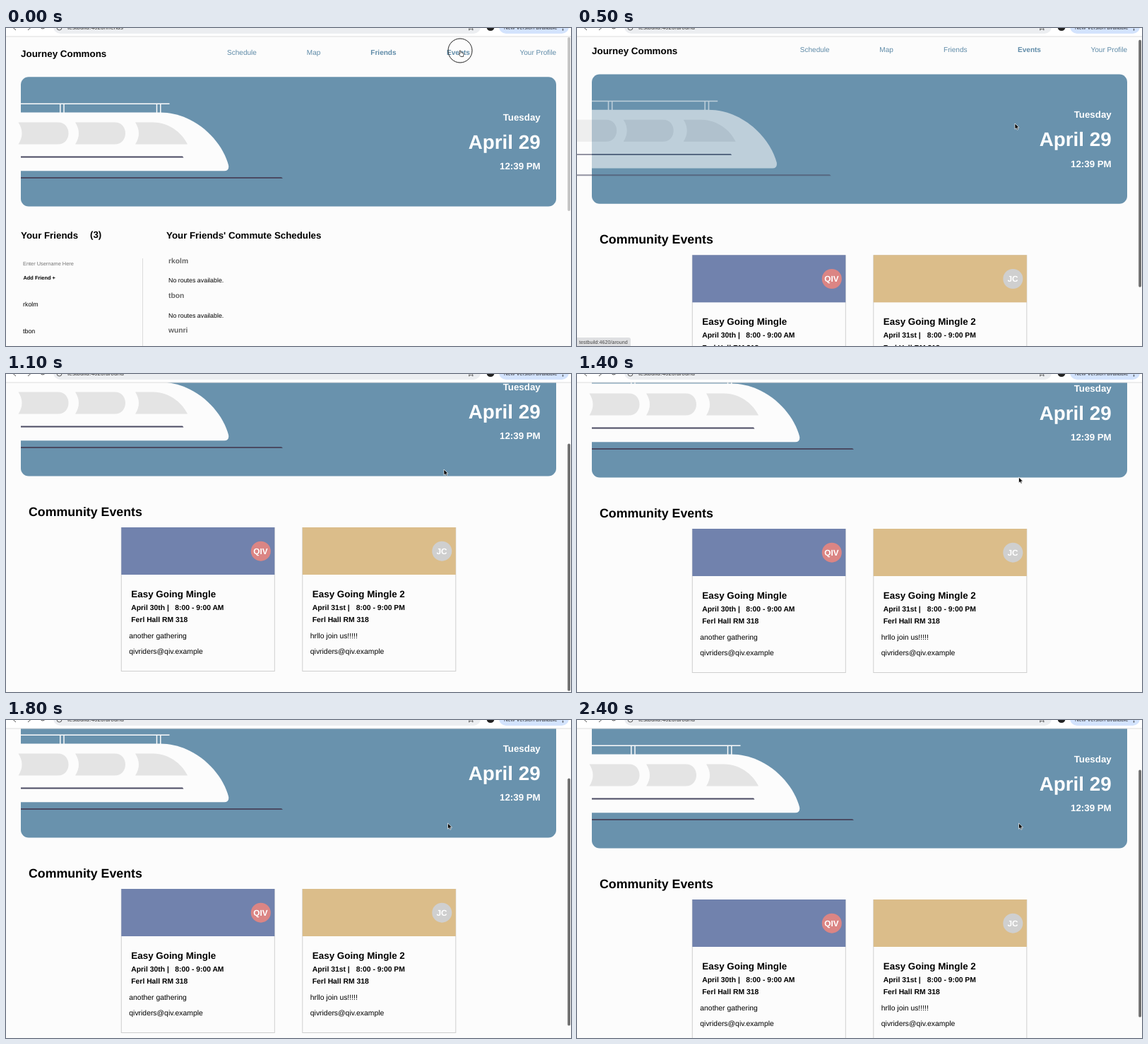
Recreate the animation shown at these times as an HTML page. Size 800 px wide and 450 px high, loop 2500 ms.

```html
<!DOCTYPE html>
<html lang="en">
<head>
<meta charset="utf-8">
<title>Commute dashboard</title>
<style>
html, body { margin: 0; width: 100%; height: 100%; overflow: hidden; background: #fcfcfc; }
svg { display: block; width: 800px; height: 450px; }
text { font-family: "Liberation Sans", Arial, sans-serif; text-rendering: geometricPrecision; white-space: pre; }
.b { font-weight: 700; }
.r { text-anchor: end; }
.m { text-anchor: middle; }
</style>
</head>
<body>
<svg id="stage" viewBox="0 0 800 450"></svg>
<script>
const BLUE = '#6992ad', LINK = '#5f8ba8', PAPER = '#fcfcfc';
const HOST = 'testbuild:4620/';

const text = (x, y, size, str, cls = '', fill = '#000') =>
  `<text x="${x}" y="${y}" font-size="${size}" class="${cls}" fill="${fill}">${str}</text>`;
const rect = (x, y, w, h, fill, extra = '') =>
  `<rect x="${x}" y="${y}" width="${w}" height="${h}" fill="${fill}" ${extra}/>`;
const path = (d, fill, extra = '') => `<path d="${d}" fill="${fill}" ${extra}/>`;
const link = (x, str, cls) => text(x, 38, 10.05, str, cls, LINK);

const train = () => {
  const pane = x => `M${x} 133.5h56c20 0 20 31 0 31h-56q10-15.5 0-31z`;
  const posts = [76.8, 82, 213.5, 218.8].map(x => `M${x} 107v13`).join('');
  return `<g id="train">` +
    path(`M21 107.2H231.5${posts}`, 'none', `stroke="${PAPER}" stroke-width="1.5"`) +
    path('M21 119.5H218C268 119.5 306 160 315 194Q316.500 202.300 309 202.300H21z', PAPER) +
    path(pane(17.5) + pane(98) + 'M183 133.500H209C231 134 249 148 257 164.500H183Q193 149 183 133.500z', '#e4e4e4') +
    path('M21 181.600H250L251.500 183.600H21zM21 211H390L392 213H21z', '#4a4a62') + `</g>`;
};

const friends = () => {
  const entry = (y, name) => text(230, y, 10.3, name, 'b', '#666') +
    text(230, y + 27.5, 8.87, 'No routes available.');
  return `<g id="friends">` +
    link(313, 'Schedule') + link(425.8, 'Map') + link(516.3, 'Friends', 'b') +
    text(21, 298, 13.3, 'Your Friends', 'b') + text(119, 296.7, 13.3, '(3)', 'b') +
    text(227, 298, 13.3, "Your Friends' Commute Schedules", 'b') +
    text(24, 335.7, 7.4, 'Enter Username Here', '', '#757575') +
    text(24.5, 355.8, 7.4, 'Add Friend +', 'b') +
    text(24, 394.2, 8.87, 'rkolm') + text(24, 432.2, 8.87, 'tbon') +
    rect(193, 326, 1, 200, '#dcdcdc') +
    entry(332.7, 'rkolm') + entry(382, 'tbon') + entry(431.3, 'wunri') + `</g>`;
};

const card = (x, tint, badge, initials, title, day, hours, note) =>
  `<g transform="translate(${x} 325)">` +
  rect(.5, .5, 217, 203, PAPER, 'stroke="#cfcfcf"') + rect(.5, 0, 217, 67, tint) +
  `<circle cx="198" cy="33.700" r="14" fill="${badge}"/>` +
  text(197.7, 37.8, 11.8, initials, 'b m', '#fff') +
  text(14.5, 98.5, 13.4, title, 'b') +
  text(14.5, 116.7, 10.35, day + ' |', 'b') + text(76.5, 116.7, 10.35, hours, 'b') +
  text(14.5, 134.3, 10.35, 'Ferl Hall RM 318', 'b') +
  text(11.5, 156.5, 10.4, note) + text(11.5, 178.8, 10.4, 'qivriders@qiv.example') + `</g>`;

const events = () => `<g id="events">` +
  link(315.8, 'Schedule') + link(428.3, 'Map') + link(519, 'Friends') +
  text(32, 308.6, 17.75, 'Community Events', 'b') +
  card(162.8, '#7182ad', '#db8584', 'QIV', 'Easy Going Mingle', 'April 30th', '8:00 - 9:00 AM', 'another gathering') +
  card(419.3, '#dbbd8a', '#cfcfcf', 'JC', 'Easy Going Mingle 2', 'April 31st', '8:00 - 9:00 PM', 'hrllo join us!!!!!') + `</g>`;

const toolbar = () => rect(0, 0, 800, 12, '#fff') + rect(0, 11.5, 800, 1, '#dedede') +
  rect(67, -14, 605, 22, '#eceef1', 'rx="10"') +
  path('M14-4L10-.5l4 3.500M31-4l4 3.500-4 3.500M55.500-1.500a3.700 3.700 0 0 1-7 0', 'none', 'stroke="#555"') +
  `<circle cx="75.500" cy="-.500" r="3.500" fill="none" stroke="#555"/>` +
  `<text id="url" x="87" y="2" font-size="8.300" fill="#333"></text>` +
  path('M655.500 3l.800-4h4l.800 4-2.800-1.800z', 'none', 'stroke="#555" stroke-width=".9"') +
  `<circle cx="686" cy="-1.500" r="5.500" fill="#222"/>` +
  rect(698, -14, 99, 22, '#d3e3fd', 'rx="10"') +
  text(705, 2, 7.7, 'New Version available', '', '#333') +
  `<circle cx="788.500" cy="-.500" r=".9" fill="#333"/><circle cx="788.500" cy="2.500" r=".9" fill="#333"/>`;

document.getElementById('stage').innerHTML =
  rect(0, 0, 800, 450, PAPER) +
  `<g id="page">` + text(21, 41.2, 13.4, 'Journey Commons', 'b') +
  link(624, 'Events', 'b') + link(727.5, 'Your Profile') +
  rect(21, 69.2, 758, 183.2, BLUE, 'rx="11"') + train() +
  text(756.7, 130.8, 13.3, 'Tuesday', 'b r', '#fff') +
  text(756.7, 170.7, 27.8, 'April 29', 'b r', '#fff') +
  text(756.7, 200.3, 13.3, '12:39 PM', 'b r', '#fff') +
  friends() + events() + `</g>` +
  rect(795.2, 0, 3.8, 350, '#6e6e6e', 'id="thumb" rx="1.900"') +
  `<g id="status">` + path('M0 438H73q3 0 3 3v9H0z', '#dfe0e2') +
  text(3, 446.6, 7.15, HOST + 'around', '', '#444') + `</g>` + toolbar() +
  `<g id="cursor">` +
  path('M0 0V8.200L1.900 6.500 3.200 9.200 4.600 8.600 3.400 5.900H6z', '#000', 'id="arrow" stroke="#fff" stroke-width=".7"') +
  path('M-.600 0q1-.8 1.400.3l.6 2.400 3 .8q.8.300.6 1.300l-.5 3.700H.8L-2 5q0-1 1.800-.2z', '#fff', 'id="hand" stroke="#222" stroke-width=".8"') +
  `</g><circle id="ring" cx="643" cy="32" r="17" fill="none" stroke="#222"/>`;

const $ = id => document.getElementById(id);
const show = (id, on) => $(id).setAttribute('display', on ? 'inline' : 'none');

// Linear interpolation through [time, value] points.
const track = (points, t) => {
  const i = points.findIndex(p => p[0] > t);
  if (i < 0) return points[points.length - 1][1];
  const [t0, v0] = points[i - 1], [t1, v1] = points[i];
  return v0 + (v1 - v0) * (t - t0) / (t1 - t0);
};

const SCROLL = [[0, 0], [400, 0], [500, 3.7], [600, 50], [700, 102], [800, 114.4], [900, 113],
  [1000, 110], [1200, 106], [1400, 106], [1500, 103], [1800, 86], [1900, 82.8], [2100, 77.5], [2400, 71]];
const CURSOR_X = [[0, 643], [100, 643], [500, 620], [1200, 620], [1400, 625.5]];
const CURSOR_Y = [[0, 32], [100, 32], [500, 135], [1200, 135], [1400, 146]];
const THUMB = [[0, .4], [100, .25], [300, 0], [400, 1], [1100, 1], [1300, 0], [1400, 0], [1500, 1]];

function draw(t) {
  const onFriends = t < 100, scroll = track(SCROLL, t);
  const x = track(CURSOR_X, t), y = track(CURSOR_Y, t);

  show('friends', onFriends);
  show('events', !onFriends);
  show('ring', onFriends);
  show('status', !onFriends && t < 700);
  $('url').textContent = HOST + (onFriends ? 'friends' : 'around');
  $('page').setAttribute('transform', `translate(0 ${-scroll})`);

  // The train slides and fades in when the page opens.
  const rest = onFriends ? 0 : Math.max(0, 1 - (t - 100) / 1000) ** 1.7;
  $('train').setAttribute('transform', `translate(${-77 * rest} 0)`);
  $('train').setAttribute('opacity', 1 - rest);

  $('thumb').setAttribute('y', 13 + .8 * Math.min(scroll, 106) + (onFriends ? 0 : .8));
  $('thumb').setAttribute('height', onFriends ? 246 : 350);
  $('thumb').setAttribute('opacity', track(THUMB, t));

  $('cursor').setAttribute('transform', `translate(${x} ${y})`);
  show('hand', y < 45);
  show('arrow', y >= 45);
}

const start = performance.now();
function tick() {
  const t = (performance.now() - start) % 2500;
  draw(Math.floor(t / 100) * 100);
  requestAnimationFrame(tick);
}
tick();
</script>
</body>
</html>
```
